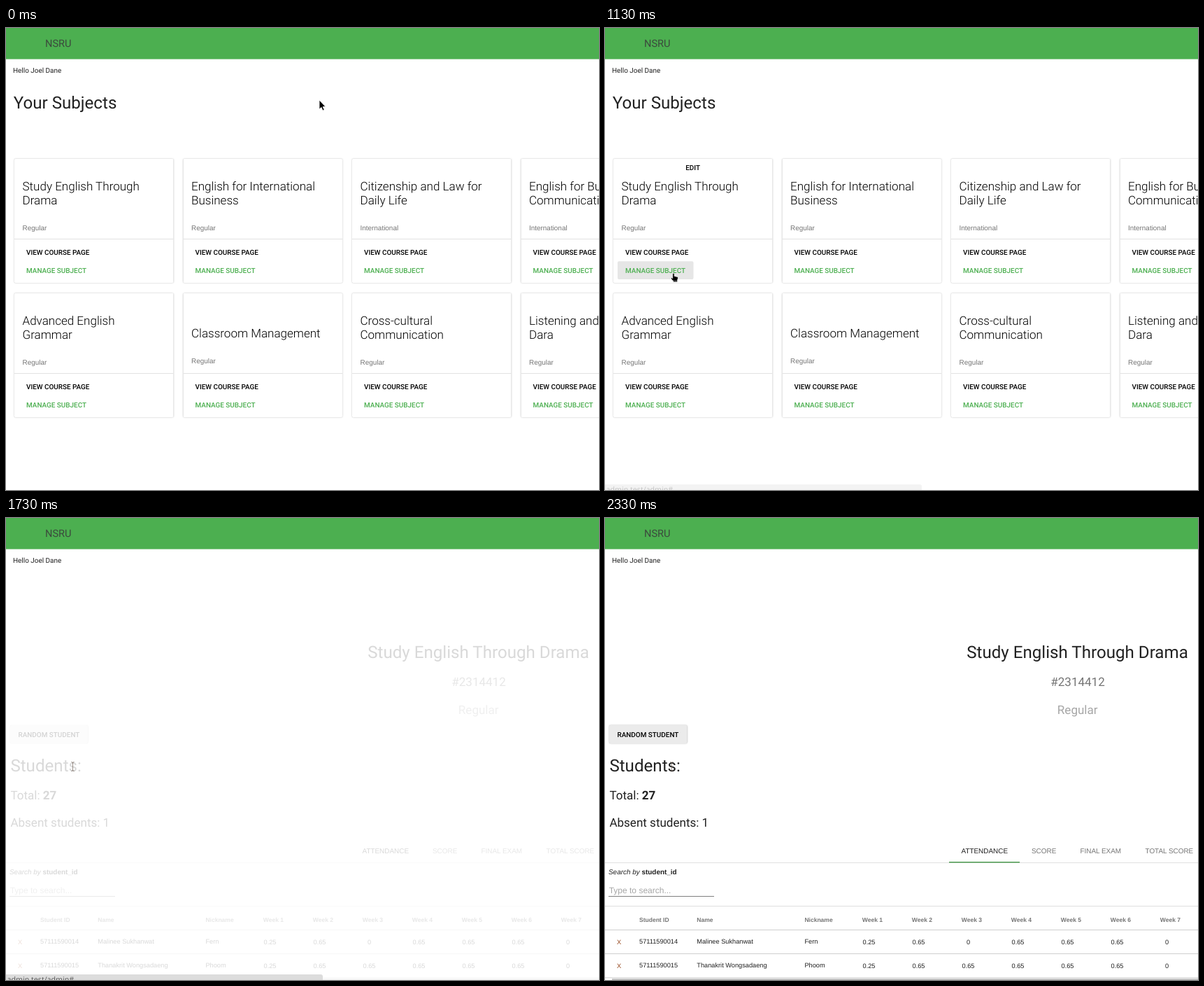
These frames come from a looping animation (848 px wide and 660 px high, 2790 ms). An HTML page:

```html
<!DOCTYPE html>
<html lang="en">
<head>
<meta charset="utf-8">
<title>Subjects</title>
<style>
html, body { margin: 0; width: 100%; height: 100%; overflow: hidden; background: #fff; }
svg { display: block; width: 848px; height: 660px; text-rendering: geometricPrecision; }
text { white-space: pre; fill: #212121; }
.rob { font-family: Roboto, sans-serif; }
.lib { font-family: "Liberation Sans", Arial, sans-serif; }
.light { font-weight: 300; fill: #000; }
.med { font-weight: 500; fill: #000; }
.bold { font-weight: 700; }
.green { fill: #4caf50; }
.grey { fill: #757575; }
.pale { fill: #a6a6a6; }
.raised { filter: drop-shadow(0 .6px .8px rgba(0,0,0,.22)) drop-shadow(0 .7px .5px rgba(0,0,0,.16)); }
</style>
</head>
<body>
<svg id="stage" viewBox="0 0 848 660" xmlns="http://www.w3.org/2000/svg">
  <rect width="848" height="660" fill="#fff"/>
  <g id="subjects"></g>
  <g id="course"></g>
  <g id="top"></g>
  <g id="status">
    <path d="M0 652H450Q453 652 453 655V660H0Z" fill="#dcdcdc"/>
    <text x="1.5" y="663" font-size="10.7" style="font-family:'Open Sans',sans-serif;fill:#555">admin.test/admin#</text>
  </g>
  <g id="arrow">
    <path d="M0 0V13L3 10.4L5 15L7.2 14L5.2 9.6H9Z" fill="#000" stroke="#fff" stroke-width=".8"/>
  </g>
  <g id="hand">
    <path d="M-1.3 .8Q0 -.8 1.2 .8V4.2L5.6 5.2Q6.6 5.6 6.4 7L5.6 10V12.6H-.6V11L-3.6 7.8Q-4 6.4 -2.6 6.5L-1.3 7.4Z" fill="#000" stroke="#fff" stroke-width=".7"/>
    <path d="M.6 10.3V12M2.4 10.3V12M4.2 10.3V12" stroke="#fff" stroke-width=".5"/>
  </g>
  <path id="beam" d="M93.5 348.5Q95.5 348.5 95.5 350V360Q95.5 361.5 93.5 361.5M97.5 348.5Q95.5 348.5 95.5 350M95.5 360Q95.5 361.5 97.5 361.5" fill="none" stroke="#6b5a50" stroke-width=".9" opacity=".75"/>
</svg>
<script>
const $ = id => document.getElementById(id);
const clamp = v => Math.max(0, Math.min(1, v));
const ramp = (t, from, to) => clamp((t - from) / (to - from));

const BODY = 9.94, TITLE = 17.04, HEAD = 24.14, CELL = 9.23, SMALL = 8.52;
const text = (x, y, size, cls, str, anchor = 'start') =>
  `<text x="${x}" y="${y}" font-size="${size}" class="${cls}" text-anchor="${anchor}">${str}</text>`;
const rect = (x, y, w, h, fill, extra = '') =>
  `<rect x="${x}" y="${y}" width="${w}" height="${h}" fill="${fill}" ${extra}/>`;
const rule = (y, color) => rect(0, y, 848, 1, color);

// Subject cards
const CARD_W = 241.5, CARD_H = 192;
const cards = [
  [['Study English Through', 'Drama'], 'Regular'],
  [['English for International', 'Business'], 'Regular'],
  [['Citizenship and Law for', 'Daily Life'], 'International'],
  [['English for Business', 'Communication'], 'International'],
  [['Advanced English', 'Grammar'], 'Regular'],
  [['Classroom Management'], 'Regular'],
  [['Cross-cultural', 'Communication'], 'Regular'],
  [['Listening and', 'Dara'], 'Regular']
];

function card([lines, kind], i) {
  const x = (i % 4) * CARD_W, y = Math.floor(i / 4) * CARD_H;
  const single = lines.length === 1;
  const title = lines.map((s, n) => text(23.5, (single ? 250 : 232) + n * 19.9, TITLE, 'rob light', s)).join('');
  return `<g transform="translate(${x} ${y})">` +
    rect(12, 187, 227.5, 177, '#fff', 'rx="1.4" class="raised"') +
    (i ? '' : rect(18, 333.3, 108.5, 25.7, '#e6e6e6', 'rx="2" id="hover"')) +
    (i < 2 ? `<g id="edit${i}">${text(125.6, 203, BODY, 'rob med', 'EDIT', 'middle')}</g>` : '') +
    title +
    text(23.5, single ? 287.3 : 288.5, BODY, 'lib grey', kind) +
    rect(12, 301, 227.5, 1, '#e2e2e2') +
    text(29, 324, BODY, 'rob med', 'VIEW COURSE PAGE') +
    text(29, 349.6, BODY, 'rob med green', 'MANAGE SUBJECT') + '</g>';
}

$('subjects').innerHTML = text(10.7, 114.5, HEAD, 'rob', 'Your Subjects') + cards.map(card).join('');

// Course page
const students = [
  ['57111590014', 'Malinee Sukhanwat', 'Fern', [.25, .65, 0, .65, .65, .65, 0]],
  ['57111590015', 'Thanakrit Wongsadaeng', 'Phoom', [.25, .65, .65, .65, .65, .65, 0]]
];
const weekX = n => 71 * n;

function studentRow([id, name, nick, marks], i) {
  const y = 608.2 + i * 34.1;
  return `<text x="17" y="${y + .3}" font-size="${CELL}" class="lib" style="fill:#96481f">X</text>` +
    text(49, y, CELL, 'lib', id) + text(131.3, y, CELL, 'lib', name) + text(285.4, y, CELL, 'lib', nick) +
    marks.map((m, n) => text(377.5 + weekX(n), y + .6, CELL, 'lib', m, 'middle')).join('') +
    rule(622 + i * 34.3, '#cfcfcf');
}

$('course').innerHTML =
  text(675.5, 199.8, HEAD, 'rob', 'Study English Through Drama', 'middle') +
  text(676, 239.7, TITLE, 'rob grey', '#2314412', 'middle') +
  text(675.7, 279.5, TITLE, 'rob pale', 'Regular', 'middle') +
  rect(6, 296, 111.5, 26, '#ebebeb', 'rx="2" class="raised"') +
  text(17.5, 312.8, BODY, 'rob med', 'RANDOM STUDENT') +
  text(6.4, 362, HEAD, 'rob', 'Students:') +
  text(6.4, 401.6, TITLE, 'rob', 'Total: <tspan class="bold">27</tspan>') +
  text(6.4, 441.4, TITLE, 'rob', 'Absent students: 1') +
  text(509.5, 479.2, BODY, 'lib', 'ATTENDANCE') +
  text(610, 479.2, BODY, 'lib grey', 'SCORE') +
  text(679.5, 479.2, BODY, 'lib grey', 'FINAL EXAM') +
  text(772.5, 479.2, BODY, 'lib grey', 'TOTAL SCORE') +
  rule(492, '#e0e0e0') +
  rect(492, 491, 101, 1.5, '#4f9d52', 'id="ink"') +
  text(5, 509.4, BODY, 'lib', '<tspan font-style="italic">Search by </tspan><tspan class="bold">student_id</tspan>') +
  text(5.7, 536, 12, 'lib pale', 'Type to search...') +
  rect(5, 540, 151, 1, '#808080') +
  rule(554, '#dedede') +
  text(49, 577, SMALL, 'lib bold grey', 'Student ID') +
  text(131.3, 577, SMALL, 'lib bold grey', 'Name') +
  text(285.4, 577, SMALL, 'lib bold grey', 'Nickname') +
  [...Array(7).keys()].map(n => text(367.8 + weekX(n), 577, SMALL, 'lib bold grey', 'Week ' + (n + 1))).join('') +
  rule(588, '#cfcfcf') +
  students.map(studentRow).join('') +
  rect(10, 658, 838, 2, '#c4c4c4');

$('top').innerHTML = rect(0, 0, 848, 44.5, '#4caf50') +
  `<text x="56" y="27.2" font-size="14.6" class="rob" style="fill:#3c4a3d">NSRU</text>` +
  text(10, 64, BODY, 'rob', 'Hello Joel Dane');

// Pointer path: time, x, y
const path = [
  [200, 448, 103], [270, 422, 120], [330, 376, 152], [400, 310, 196], [470, 247, 239],
  [530, 204, 266], [600, 164, 293], [670, 135, 313], [730, 119.5, 324],
  [800, 112, 335], [870, 106, 342], [930, 101, 347], [1000, 98, 350.3]
];

function pointer(t) {
  let i = path.findIndex(p => p[0] >= t);
  if (i < 0) i = path.length - 1;
  if (!i) return path[0].slice(1);
  const [t0, x0, y0] = path[i - 1], [t1, x1, y1] = path[i];
  const u = ramp(t, t0, t1);
  return [x0 + (x1 - x0) * u, y0 + (y1 - y0) * u];
}

const LOOP = 2790, STEP = 200 / 3;
const show = (id, v) => $(id).setAttribute('opacity', +v);

function draw(time) {
  // The screen refreshes 15 times a second
  const t = Math.round(Math.floor((time % LOOP + 4) / STEP) * STEP / 10) * 10;
  const [x, y] = pointer(t);
  const loaded = t >= 1730;

  for (const id of ['arrow', 'hand']) $(id).setAttribute('transform', `translate(${x} ${y})`);
  show('arrow', t < 800);
  show('hand', t >= 800 && !loaded);
  $('beam').style.display = loaded ? '' : 'none';

  show('edit0', t >= 530);
  show('edit1', t >= 400 && t < 530);
  show('hover', ramp(t, 780, 1070));
  const shade = Math.round(230 - 11 * ramp(t, 1200, 1330));
  $('hover').setAttribute('fill', `rgb(${shade},${shade},${shade})`);

  show('subjects', 1 - ramp(t, 1295, 1505));
  show('course', 1 - (1 - ramp(t, 1700, 2200)) ** 3);
  $('ink').setAttribute('width', 101 * ramp(t, 1730, 1944));
  show('status', ramp(t, 1060, 1260) * (1 - ramp(t, 2200, 2330)));
}

const start = performance.now();
function tick() {
  draw(performance.now() - start);
  requestAnimationFrame(tick);
}
tick();
</script>
</body>
</html>
```
